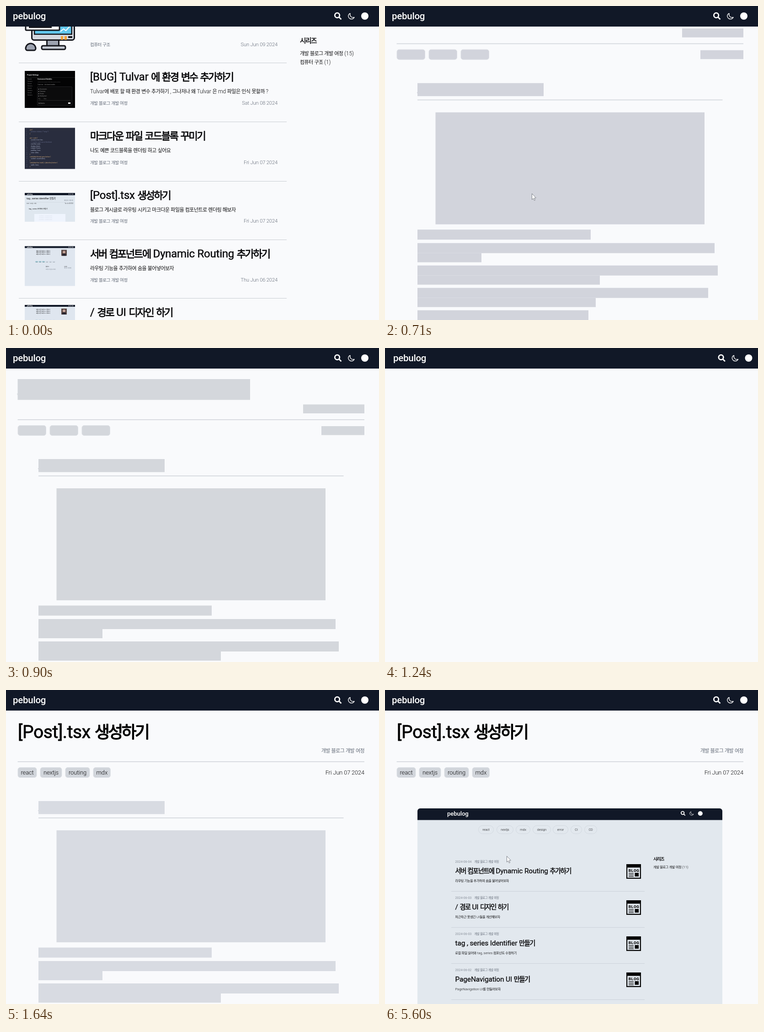
These frames come from a looping animation (816 px wide and 687 px high, 5670 ms). An HTML page with a canvas:

```html
<!DOCTYPE html>
<html lang="ko">
<head>
<meta charset="utf-8">
<style>
html, body { margin: 0; width: 100%; height: 100%; overflow: hidden; background: #f9fafc; }
canvas { display: block; }
</style>
</head>
<body>
<canvas id="stage" width="816" height="687"></canvas>
<script>
const ctx = document.getElementById('stage').getContext('2d');
const LOOP = 5670;
const PAGE = '#f9fafc', NAV = '#111827', LINE = '#d1d5db', MUTED = '#626a77', INK = '#0b0b0d';
const SITE = 'pebulog', SERIES = '개발 블로그 개발 여정';

function rect(x, y, w, h, fill) {
  ctx.fillStyle = fill;
  ctx.fillRect(x, y, w, h);
}

function round(x, y, w, h, r, fill, stroke, width = 1) {
  ctx.beginPath();
  ctx.roundRect(x, y, w, h, r);
  if (fill) { ctx.fillStyle = fill; ctx.fill(); }
  if (stroke) { ctx.strokeStyle = stroke; ctx.lineWidth = width; ctx.stroke(); }
}

function disc(x, y, r, fill) {
  ctx.beginPath();
  ctx.arc(x, y, r, 0, Math.PI * 2);
  ctx.fillStyle = fill;
  ctx.fill();
}

// Hangul runs are set slightly smaller and tighter than Latin runs.
// Headings are regular weight, thickened by a thin outline.
function text(str, x, y, size, { weight = 300, heading = false, color = INK, align = 'left' } = {}) {
  if (heading) weight = 400;
  const tight = heading ? -0.095 : -0.05;
  const runs = str.split(/([가-힣]+)/).filter(Boolean).map(s => {
    const hangul = /[가-힣]/.test(s);
    const font = hangul
      ? `${weight} ${size * 0.92}px "Noto Sans CJK KR", "Noto Sans CJK", sans-serif`
      : `${weight} ${size}px Roboto, sans-serif`;
    const gap = (hangul ? tight : -0.01) * size + 'px';
    ctx.font = font;
    ctx.letterSpacing = gap;
    return { s, hangul, font, gap, w: ctx.measureText(s).width };
  });
  const total = runs.reduce((sum, r) => sum + r.w, 0);
  if (align === 'right') x -= total;
  if (align === 'center') x -= total / 2;
  ctx.fillStyle = ctx.strokeStyle = color;
  ctx.lineJoin = 'round';
  for (const r of runs) {
    ctx.font = r.font;
    ctx.letterSpacing = r.gap;
    ctx.fillText(r.s, x, y);
    if (heading) {
      ctx.lineWidth = size * (r.hangul ? 0.035 : 0.02);
      ctx.strokeText(r.s, x, y);
    }
    x += r.w;
  }
}

function icons(x, y, k) {
  ctx.save();
  ctx.translate(x, y);
  ctx.scale(k, k);
  ctx.strokeStyle = '#fff';
  ctx.lineWidth = 2.8;
  ctx.beginPath();
  ctx.arc(-1.4, -1.6, 5.2, 0, Math.PI * 2);
  ctx.moveTo(2.4, 2.2);
  ctx.lineTo(7.4, 7.2);
  ctx.stroke();
  ctx.lineWidth = 1.4;
  ctx.lineJoin = 'round';
  ctx.beginPath();
  ctx.moveTo(27.2, -6);
  ctx.bezierCurveTo(25.4, -0.5, 29.5, 4.6, 36, 2.6);
  ctx.bezierCurveTo(33.6, 7.4, 27.2, 7.8, 24.2, 3.8);
  ctx.bezierCurveTo(21.4, 0, 23, -4.6, 27.2, -6);
  ctx.stroke();
  disc(59, 0, 8, '#fff');
  ctx.restore();
}

function nav(wide) {
  rect(0, 0, 816, 45, NAV);
  text(SITE, wide ? 18 : 15, 29, 20.4, { weight: 500, color: '#fff' });
  icons(wide ? 736.5 : 726, 22, 1);
}

function computerThumb() {
  const dark = '#15161c';
  round(56.5, 20, 93, 54.5, 5, '#d3d7df', dark, 3);
  rect(61, 20, 84, 43, dark);
  rect(63.5, 20, 79, 40.5, '#62c8ee');
  ctx.strokeStyle = '#fff';
  ctx.lineWidth = 2;
  ctx.beginPath();
  [[119, 56], [126, 50], [131, 54], [140, 44]].forEach(p => ctx.lineTo(...p));
  ctx.stroke();
  round(43, 30, 74, 23, 2, '#fff', dark, 3);
  rect(50, 45, 50, 3, dark);
  rect(120, 66, 5, 8, '#f2a33a');
  rect(128, 66, 5, 8, '#f2a33a');
  rect(136, 66, 9, 4, dark);
  rect(88, 75, 29, 13, dark);
  rect(91, 76, 23, 11, '#9da3b0');
  round(78, 87, 52, 8, 3, '#c5cad3', dark, 3);
  round(43, 82, 22, 15, [11, 11, 4, 4], '#9da3b0', dark, 3);
}

function settingsThumb(y) {
  rect(41, y, 110, 81, '#030304');
  text('Project Settings', 46, y + 9.5, 3.6, { weight: 700, color: '#fff' });
  rect(41, y + 14, 110, 0.5, '#333');
  for (let i = 0; i < 8; i++) text(i % 2 ? 'Domains' : 'General', 47, y + 19 + i * 5, 2.8, { color: '#999' });
  text('Environment Variables', 69, y + 19, 3.2, { weight: 700, color: '#eee' });
  text('Values can be read by the build and at run time.', 69, y + 25, 2.5, { color: '#aaa' });
  text('Create new    Link shared variables', 69, y + 31, 2.6, { color: '#ccc' });
  round(68.5, y + 34.5, 76, 41, 1.5, '#0b0b0c', '#303033', 0.6);
  for (let i = 0; i < 4; i++) {
    disc(71.5, y + 40 + i * 5, 0.8, '#ddd');
    text(['Environments', 'Production', 'Preview', 'Development'][i], 74, y + 41 + i * 5, 2.6, { color: '#ccc' });
  }
  text('Key            Value', 71, y + 62, 2.6, { color: '#999' });
  rect(71, y + 64, 70, 0.5, '#444');
  rect(136, y + 69, 5, 3, '#fff');
  text('Add Another', 71, y + 72, 2.6, { color: '#ddd' });
}

function codeThumb(y) {
  rect(41, y, 110, 90, '#292d3e');
  const code = ['pre {', '  position: relative; /* wrap */', '}', '', 'pre > code {', '  counter-reset: line;',
    '  // number each row of the block', '  overflow: auto;', '  display: block;', '  margin: 0 auto;',
    '  padding: 1rem;', '  color: white;', '}', 'code[data-theme] span::before {', '  content: counter(line);',
    '}', "code[data-line='wide'] > [data-line]::before {", '  width: 2rem;', '}'];
  code.forEach((s, i) => {
    const base = y + 5 + i * 4.55;
    text(String(i + 1), 44, base, 2.6, { color: '#68708c' });
    const color = /\/[/*]/.test(s) ? '#686f8e' : s[0] === ' ' ? '#b9c0d8' : '#e0b47c';
    text(s.trim(), 52 + s.search(/\S|$/) * 1.2, base, 3.3, { weight: 400, color });
  });
}

function miniNav(y, h) {
  rect(41, y, 110, h, NAV);
  text(SITE, 46, y + h - 1, 3.3, { weight: 700, color: '#fff' });
  for (let i = 0; i < 3; i++) disc(138 + i * 4, y + h / 2, 0.9, '#fff');
}

function postThumb(y) {
  rect(41, y, 110, 63, '#dfe7ef');
  miniNav(y, 5);
  text('tag , series identifier 만들기', 45, y + 14, 5.6, { weight: 400 });
  text(SERIES, 147, y + 17, 2.6, { color: MUTED, align: 'right' });
  rect(44, y + 20, 104, 0.4, '#bfc7d1');
  text('react   nextjs   mdx', 45, y + 24, 2.7);
  text('Tue Jun 04 2024', 147, y + 24, 2.6, { align: 'right' });
  text('tag , series 분리해서 만들기', 50, y + 36, 3.8, { weight: 400 });
  rect(62, y + 46, 68, 17, '#eff4fd');
  for (let i = 0; i < 3; i++) text('const tags = getTags(posts)', 72, y + 51 + i * 4, 2.4, { color: '#aab4c7' });
}

function listThumb(y) {
  rect(41, y, 110, 87, '#dfe6ef');
  miniNav(y, 4);
  for (let i = 0; i < 3; i++) text('매일 조금씩 배우고 기록하기', 66, y + 11 + i * 3.8, 3, { weight: 500 });
  rect(121, y + 8, 12, 13, '#5a4844');
  disc(127, y + 13, 3, '#c4a398');
  round(123, y + 16, 8, 5, [3, 3, 0, 0], '#292630');
  for (let i = 0; i < 6; i++) {
    round(64 + i * 7.5, y + 32.5, 6, 3, 1.5, i < 3 ? '#9fc7d3' : '#d2dbe6');
    text('react', 65 + i * 7.5, y + 35, 2);
  }
  text('블로그', 87, y + 45, 3, { weight: 500 });
  text('라우팅 기능을 추가하기', 87, y + 51, 2.6, { color: MUTED });
  text('시리즈', 127, y + 45, 2.8, { weight: 500 });
  text(SERIES, 127, y + 48, 2, { color: MUTED });
}

const posts = [
  [154, '[BUG] Tulvar 에 환경 변수 추가하기', 'Tulvar에 배포 할 때 환경 변수 추가하기 , 그나저나 왜 Tulvar 은 md 파일은 인식 못할까 ?', 'Sat Jun 08 2024', 58],
  [283, '마크다운 파일 코드블록 꾸미기', '나도 예쁜 코드블록을 렌더링 하고 싶어요', 'Fri Jun 07 2024', 59],
  [413, '[Post].tsx 생성하기', '블로그 게시글로 라우팅 시키고 마크다운 파일을 컴포넌트로 렌더링 해보자', 'Fri Jun 07 2024', 57],
  [541, '서버 컴포넌트에 Dynamic Routing 추가하기', '라우팅 기능을 추가하여 숨을 불어넣어보자', 'Thu Jun 06 2024', 58],
  [669, '/ 경로 UI 디자인 하기', '', '', 58]
];

function rowMeta(y, date, series = SERIES) {
  text(series, 184, y, 10.4, { color: MUTED });
  text(date, 594, y, 11.1, { color: MUTED, align: 'right' });
}

function listPage() {
  computerThumb();
  rowMeta(87.5, 'Sun Jun 09 2024', '컴퓨터 구조');
  settingsThumb(142);
  codeThumb(266.5);
  postThumb(409);
  listThumb(525.5);
  listThumb(654);
  for (const y of [124, 253, 383, 511, 639]) rect(28, y, 586, 1, '#c8ccd2');
  for (const [y, title, desc, date, gap] of posts) {
    text(title, 184, y + 8.5, 24, { heading: true });
    if (!date) continue;
    text(desc, 184, y + 37, 12);
    rowMeta(y + gap + 4, date);
  }
  text('시리즈', 643, 81, 16, { heading: true });
  text(SERIES + ' (15)', 643, 107.5, 12);
  text('컴퓨터 구조 (1)', 643, 127, 12);
}

// Paragraph skeleton: top, right edge of line one, right edge of line two.
const paragraphs = [[563.5, 450], [593, 721, 211], [642, 728, 470], [691, 707, 461], [740, 445], [770, 716, 330], [819, 690, 420]];

function bodySkeleton(tone) {
  rect(71, 243, 276, 28.5, tone);
  rect(70, 263, 1, 2, tone);
  rect(71, 279, 667.5, 1.6, LINE);
  rect(110.5, 307, 588.5, 245, tone);
  for (const [y, a, b] of paragraphs) {
    rect(71, y, a - 71, 22, tone);
    if (b) rect(71, y + 22, b - 71, 20, tone);
  }
}

function headSkeleton(tone) {
  rect(25.5, 68, 508.5, 45.5, tone);
  rect(24.5, 99, 1, 4, tone);
  rect(650, 123.5, 134, 19.5, tone);
  rect(690, 171, 94, 19.5, tone);
  for (const x of [25.5, 95.5, 165.5]) round(x + 0.5, 169.5, 61.5, 22, 5, tone, '#dfe2e7');
}

function rule() {
  rect(25.5, 156, 758.5, 1.6, LINE);
}

function postHead() {
  text('[Post].tsx 생성하기', 26, 105, 39, { heading: true, color: '#000' });
  text(SERIES, 784, 137, 12, { color: MUTED, align: 'right' });
  rule();
  for (const [tag, x, w] of [['react', 25.5, 42], ['nextjs', 74.5, 48], ['routing', 129.5, 54], ['mdx', 190.5, 38.5]]) {
    round(x + 0.5, 169.5, w - 1, 22, 5, LINE, '#dfe2e7');
    text(tag, x + w / 2, 185, 13, { align: 'center' });
  }
  text('Fri Jun 07 2024', 784, 185, 12.8, { align: 'right' });
}

function blogIcon(x, y) {
  rect(x, y, 32, 32, '#050505');
  rect(x + 2.2, y + 7.5, 27.6, 22.2, '#e2e8ee');
  ctx.letterSpacing = '0.2px';
  ctx.font = '700 9.4px "Noto Sans Mono", monospace';
  ctx.fillStyle = '#050505';
  ctx.fillText('BLOG', x + 4.4, y + 17);
  for (let i = 0; i < 3; i++) rect(x + 5, y + 19.5 + i * 3.4, 11, 1.3, '#050505');
  rect(x + 18.5, y + 19, 8.5, 8, '#050505');
}

const shotRows = [
  ['2024-06-04', '서버 컴포넌트에 Dynamic Routing 추가하기', '라우팅 기능을 추가하여 숨을 불어넣어보자'],
  ['2024-06-03', '/ 경로 UI 디자인 하기', '차근차근 못생긴 UI들을 개선해보자'],
  ['2024-06-03', 'tag , series Identifier 만들기', '로컬 파일 읽어와 tag, series 컴포넌트 수정하기'],
  ['2024-06-02', 'PageNavigation UI 만들기', 'PageNavigation UI를 만들어보자']
];
const pills = [['react', 204, 34], ['nextjs', 244, 37], ['mdx', 286, 32], ['design', 323, 40], ['error', 367, 34], ['CI', 406, 25], ['CD', 436, 28]];

function screenshot() {
  round(71, 259, 667, 440, 6, '#e2e8ee');
  round(71, 259, 667, 25.5, [6, 6, 0, 0], NAV);
  text(SITE, 136, 275, 13.2, { weight: 500, color: '#fff' });
  icons(652, 270, 0.64);
  for (const [tag, x, w] of pills) {
    round(x + 0.5, 296.5, w - 1, 18, 9, null, '#cfd5dc', 0.8);
    text(tag, x + w / 2, 308, 7.2, { align: 'center' });
  }
  shotRows.forEach(([date, title, desc], i) => {
    const y = i * 78.9;
    text(date, 153.5, y + 378, 7.3, { color: MUTED });
    text(SERIES, 195.5, y + 378, 6.8, { color: MUTED });
    text(title, 153.5, y + 401, 15.5, { heading: true });
    text(desc, 153.5, y + 420, 7.7);
    blogIcon(528, Math.round(y + 381));
    rect(145, Math.round(y + 440), 423, 1, '#cbd2da');
  });
  text('시리즈', 587, 373, 10.4, { heading: true });
  text(SERIES + ' (11)', 587, 390, 7.8);
}

function along(points, p) {
  const n = points.length - 1;
  const i = Math.min(n - 1, Math.floor(p * n));
  const f = p * n - i;
  return [0, 1].map(k => points[i][k] + (points[i + 1][k] - points[i][k]) * f);
}

const approach = [[754, 655], [400, 610], [65, 520], [210, 440], [321, 410]];
const scrollSteps = [[640, 190], [710, 74.3], [770, 27], [830, 8], [900, 0]];

function skeletonPage(t) {
  const scroll = scrollSteps.filter(s => t >= s[0]).pop()[1];
  const tone = t < 770 ? '#d2d4dc' : '#d4d7dc';
  ctx.save();
  ctx.translate(0, -scroll);
  headSkeleton(tone);
  rule();
  bodySkeleton(tone);
  ctx.restore();
}

function draw(t) {
  rect(0, 0, 816, 687, PAGE);
  if (t < 640) {
    listPage();
  } else if (t < 1240) {
    skeletonPage(t);
  } else if (t >= 1300) {
    postHead();
    if (t < 5330) bodySkeleton('#d8dbe2');
    else screenshot();
  }
  nav(t >= 1240 && t < 1300);

  if (t >= 70 && t < 770) {
    cursor(...along(approach, Math.min(1, Math.floor((t - 70) / 62.5) / 8)));
  } else if (t >= 5460) {
    cursor(...along([[340, 430], [266, 363]], Math.min(1, Math.floor((t - 5460) / 70) / 2)));
  }
}

function cursor(x, y) {
  ctx.beginPath();
  [[0, 0], [0, 13], [3, 10.4], [5, 15], [7, 14.1], [5, 9.7], [8.8, 9.3]]
    .forEach(([dx, dy]) => ctx.lineTo(x + dx + 0.5, y + dy + 0.5));
  ctx.closePath();
  ctx.fillStyle = '#fff';
  ctx.fill();
  ctx.strokeStyle = '#6f737b';
  ctx.lineWidth = 0.9;
  ctx.stroke();
}

function tick() {
  draw(performance.now() % LOOP);
  requestAnimationFrame(tick);
}
tick();
</script>
</body>
</html>
```
